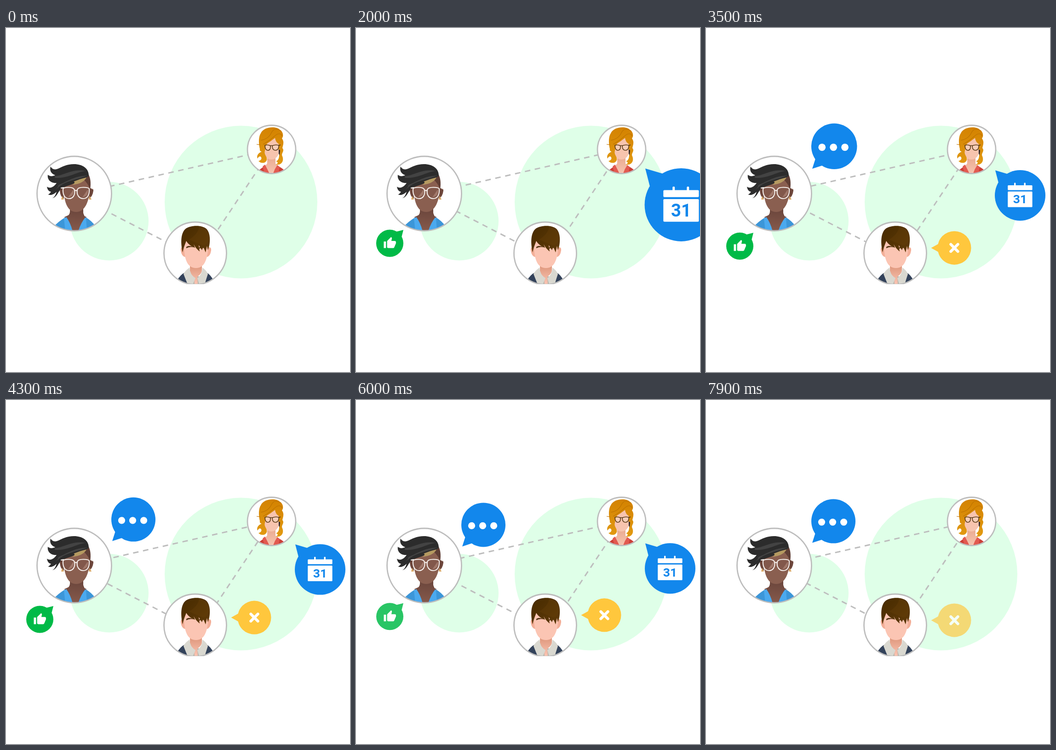
Animation, 748 px wide and 748 px high, one loop 8 s. Source, as an HTML page:

```html
<!DOCTYPE html>
<html lang="en">
<head>
<meta charset="utf-8">
<title>Connected people</title>
<style>
html, body { margin: 0; width: 100%; height: 100%; overflow: hidden; background: #fff; }
svg { display: block; width: 100vw; height: 100vh; }
.link { stroke: #bdbdbd; stroke-width: 3; stroke-dasharray: 12 10; }
.ring { fill: none; stroke: #bdbdbd; stroke-width: 2.8; }
.date { font: 600 26.5px Roboto, "Liberation Sans", sans-serif; text-anchor: middle; }
</style>
</head>
<body>
<svg viewBox="0 0 748 748">
  <defs>
    <clipPath id="clipA"><circle cx="148.5" cy="360" r="80"/></clipPath>
    <clipPath id="clipB"><circle cx="411.5" cy="490" r="67"/></clipPath>
    <clipPath id="clipC"><circle cx="577.5" cy="264" r="51.5"/></clipPath>
    <clipPath id="flat"><path d="M0 0H748V557H0z"/></clipPath>
    <linearGradient id="neckA" x1="0" x2="0" y1="0" y2="1">
      <stop offset="0" stop-color="#67433a"/><stop offset="1" stop-color="#85594b"/>
    </linearGradient>
    <linearGradient id="neckB" x1="0" x2="0" y1="0" y2="1">
      <stop offset="0" stop-color="#d98f73"/><stop offset="1" stop-color="#fbc5b3"/>
    </linearGradient>
    <linearGradient id="neckC" x1="0" x2="0" y1="0" y2="1">
      <stop offset="0" stop-color="#eaa98f"/><stop offset="1" stop-color="#f7c6b2"/>
    </linearGradient>
    <linearGradient id="brown" x1="0" x2="1" y1="0" y2="1">
      <stop offset="0" stop-color="#472b00"/><stop offset="1" stop-color="#5f3a08"/>
    </linearGradient>
    <linearGradient id="ginger" x1="0" x2="0" y1="0" y2="1">
      <stop offset="0" stop-color="#d38200"/><stop offset="1" stop-color="#e29a12"/>
    </linearGradient>
  </defs>

  <g fill="#dfffe8">
    <circle cx="224.5" cy="420" r="85.5"/>
    <circle cx="511" cy="378.5" r="166"/>
  </g>

  <path class="link" d="M181.3 354.5L561 268"/>
  <path class="link" d="M377 480L173 375"/>
  <path class="link" d="M565.4 281.4L421 498"/>

  <!-- left person -->
  <circle cx="148.5" cy="360" r="81" fill="#fff"/>
  <g clip-path="url(#clipA)">
    <path fill="#3c96d8" d="M102 434Q113 421 130 411L172 411Q186 418 197 434V445H102z"/>
    <path fill="#764c40" d="M127 411L138 406H164L175 411L157 446H145z"/>
    <path fill="url(#neckA)" d="M139 386H168V402Q170 409 173 412Q166 424 158 440H145Q139 423 129 412Q138 408 139 400z"/>
    <path fill="#4ba9ee" d="M131 411Q140 423 145 442H129L126 414z M173 411Q163 423 157 442H176L174 414z"/>
    <path fill="#6d463b" d="M125 350Q116 345 117 354Q118 368 126 371z M181 350Q190 344 190 354Q188 368 180 371z"/>
    <path fill="#d9a866" d="M122 365l4 8h-6z M182 365l4 8h-6z"/>
    <path fill="#8a5f50" d="M125 340C125 378 133 400 152.5 400C172 400 182 377 183 340L179 321L132 334z"/>
    <path fill="#5f3e35" d="M179 318Q186 329 183 351Q178 337 168 329z"/>
    <path fill="#2c2c2c" d="M180 321C180 305 166 296 148 296C132 296 122 302 113 306C106 309 100 307 97 301C94 311 99 317 107 320C101 323 95 323 91 319C89 330 98 338 110 337C104 346 96 350 89 345C90 352 94 356 98 356C95 360 93 362 91 362C98 365 105 361 110 356C108 363 105 368 101 370C111 368 114 354 122 347C135 343 150 338 160 332C168 328 176 326 180 321z"/>
    <path fill="#434343" d="M105 322C124 322 145 304 174 311C154 312 137 327 107 326z M110 343C126 338 147 321 177 321C158 329 134 331 118 343L106 353Q112 348 114 342z"/>
    <path fill="#b59a61" d="M143 341C154 340 169 337 175 325C165 327 157 330 147 334C151 335 149 339 143 341z"/>
    <g stroke="#f4eeea" stroke-width="2.2" fill="#82584b">
      <path d="M119 348L126 347M185 348L190 350M149 355Q152 351 155 355" fill="none"/>
      <path d="M124 350Q125 346.500 136 346.500T149 352C151 364 145 371 137 371S123 364 124 350z M155 352Q156 346.500 168 346.500T181 350C182 364 176 371 168 371S153 364 155 352z"/>
    </g>
    <path fill="#a1796b" d="M135 368L147 351Q149 366 135 368z M166 368L178 351Q180 366 166 368z"/>
  </g>
  <circle class="ring" cx="148.5" cy="360" r="81"/>

  <!-- lower person -->
  <g clip-path="url(#flat)">
    <circle cx="411.5" cy="490" r="68" fill="#fff"/>
    <g clip-path="url(#clipB)">
      <path fill="#33425a" d="M371 551Q378 536 392 530L404 560H371z M452 551Q446 536 433 530L420 560H452z"/>
      <path fill="#b8b6ae" d="M402 540H425V560H402z"/>
      <path fill="url(#neckB)" d="M400 510H426V524Q427 534 416 541L417 557H410L409 542Q398 534 400 524z"/>
      <path fill="#d9d8d0" d="M399 521Q389 528 386 535L396 560H405L412 544Q400 537 399 521z M427 521Q436 527 439 535L431 560H421L416 544Q427 536 427 521z"/>
      <path fill="#f3af98" d="M388 478Q379 474 380 484Q382 497 390 498z M437 478Q447 474 446 484Q444 497 436 498z"/>
      <path fill="#fbc5b3" d="M387 470C387 500 393 522 413 522S439 500 440 470L434 452H392z"/>
      <path fill="#573818" d="M392 476Q399 471 408 477Q399 475 392 479z M420 477Q428 473 434 477L433 480Q427 476 420 480z"/>
      <path fill="url(#brown)" d="M384 488C380 470 379 447 390 437C402 428 428 428 437 438C446 449 444 472 439 483L437 474L434 488L429 476L426 483L419 472L421 486C415 481 411 476 408 470L411 478C403 475 396 470 392 463C389 471 386 478 384 488z"/>
      <path fill="#6a430c" opacity=".3" d="M398 460Q418 448 420 432Q439 434 442 458Q438 471 430 473Q414 468 398 460z"/>
    </g>
    <circle class="ring" cx="411.5" cy="490" r="68"/>
  </g>

  <!-- right person -->
  <circle cx="577.5" cy="264" r="52.5" fill="#fff"/>
  <g clip-path="url(#clipC)">
    <path fill="#cc4038" d="M548 312Q555 303 567 299H587Q601 303 607 312V320H548z"/>
    <path fill="url(#neckC)" d="M568 280H586V295Q590 298 592 300L580 319H573L561 300Q568 297 568 293z"/>
    <path fill="#e25a50" d="M563 297Q569 308 574 319H563L558 301z M590 298Q583 308 580 319H592L595 302z"/>
    <path fill="#efad92" d="M558 255Q551 250 552 260Q553 269 560 270z"/>
    <path fill="#f7c4ae" d="M557 248C556 270 563 286 577 286S597 270 598 248L588 232H566z"/>
    <path fill="url(#ginger)" d="M552 263C549 252 549 236 554 229C560 214 588 213 595 221C603 225 604 236 600 240C606 248 602 255 601 261C607 268 597 272 601 279C605 289 599 299 587 297C593 294 591 291 587 290C594 287 594 280 594 272Q592 262 593 252Q586 248 585 239Q576 246 568 251Q564 258 563 267C560 275 569 280 567 287C565 295 553 295 549 289C555 288 557 283 554 280C552 278 549 280 547 284C544 278 549 271 556 269Q551 268 552 263z"/>
    <path fill="none" stroke="#bd7200" stroke-width="1.2" d="M554 244Q570 242 577 228T598 224M559 253Q573 245 584 235T601 235M545 253L553 254"/>
    <path fill="#2f2831" d="M593 264l3 2l-1 11l-2-4z"/>
    <g fill="#f8d5c2" fill-opacity=".6" stroke="#5b3c19" stroke-width="1.6">
      <path d="M563 255Q569 253 575 256Q576 266 569 266Q563 265 563 255z M579 256Q585 253 593 255Q594 265 586 266Q579 266 579 256z"/>
      <path fill="none" d="M574 257Q577 254 580 257M593 256L597 254"/>
    </g>
  </g>
  <circle class="ring" cx="577.5" cy="264" r="52.5"/>

  <!-- each bubble is drawn around the tip of its tail -->
  <g id="like" fill="#00ba47">
    <circle cx="-29.5" cy="29" r="29.5"/><path d="M0 0L-16 4L-4 16z"/>
    <path fill="#fff" transform="translate(-43.7 14.3) scale(1.2)" d="M1 21h4V9H1z M23 10a2 2 0 0 0-2-2h-6.3l1-4.6Q15.8 2.6 15.2 2L14.2 1L7.6 7.6Q7 8.2 7 9v10a2 2 0 0 0 2 2h9q1.3 0 1.8-1.2l3-7.1q.2-.3.2-.7z"/>
  </g>
  <g id="plan" fill="#1287ec">
    <circle cx="54" cy="54.5" r="55"/><path d="M0 0L34 10L9 35z"/>
    <g fill="#fff">
      <rect x="27.2" y="32.5" width="53.4" height="10.5" rx="1.5"/>
      <rect x="27.2" y="46" width="53.4" height="34" rx="1.5"/>
      <rect x="41" y="27" width="3.4" height="8" rx="1.4"/>
      <rect x="62.5" y="27" width="3.4" height="8" rx="1.4"/>
    </g>
    <text class="date" x="54" y="72">31</text>
  </g>
  <g id="deny" fill="#ffc73d">
    <circle cx="50.5" cy="0" r="36.5"/><path d="M0 0L18 -10L18 10z"/>
    <path stroke="#fff" stroke-width="6" stroke-linecap="round" d="M42.8 -7.7L58.2 7.7M58.2 -7.7L42.8 7.7"/>
  </g>
  <g id="chat" fill="#1287ec">
    <circle cx="46" cy="-47" r="48"/><path d="M0 0L8 -25L28 -9z"/>
    <g fill="#fff">
      <circle cx="20.5" cy="-45" r="7.6"/><circle cx="44.5" cy="-45" r="7.6"/><circle cx="68.5" cy="-45" r="7.6"/>
    </g>
  </g>
</svg>
<script>
const LOOP = 8000, STEP = 100;
const RISE = 540, SETTLE = 570, FADE = 600;
const DASH = 22, DASH_TIME = 3000;

const bubbles = [
  { id: "like", x: 103, y: 439, pop: 915, peak: 1.5, bob: 1930, drop: 9, period: 5000, fade: 5900 },
  { id: "plan", x: 629, y: 305.6, pop: 1553, peak: 1.5, bob: 2430, drop: 10, period: 5000, fade: 6600 },
  { id: "deny", x: 489.5, y: 479.4, pop: 2260, peak: 1.5, bob: 2950, drop: -12.2, period: 5300, fade: 7700 },
  { id: "chat", x: 231, y: 306, pop: 2765, peak: 1.05, bob: 3900, drop: 13.2, period: 5000, fade: Infinity }
];
for (const b of bubbles) b.el = document.getElementById(b.id);
const links = document.querySelectorAll(".link");

const clamp = v => Math.max(0, Math.min(1, v));
const swing = v => (1 - Math.cos(Math.PI * v)) / 2;

// Grow past full size, then settle back to 1.
function popScale(age, peak) {
  if (age < RISE) return peak * Math.sin(Math.PI / 2 * clamp(age / RISE));
  return peak + (1 - peak) * swing(clamp((age - RISE) / SETTLE));
}

function draw(t) {
  for (const link of links) link.style.strokeDashoffset = -DASH * (t % DASH_TIME) / DASH_TIME;
  for (const b of bubbles) {
    const scale = popScale(t - b.pop, b.peak);
    const y = b.y + b.drop * swing(2 * Math.max(0, t - b.bob) / b.period);
    b.el.setAttribute("transform", `translate(${b.x} ${y}) scale(${scale})`);
    b.el.setAttribute("opacity", scale > 0 ? 1 - clamp((t - b.fade) / FADE) : 0);
  }
}

const start = performance.now();
function tick() {
  const t = (performance.now() - start) % LOOP;
  draw(Math.floor(t / STEP) * STEP);
  requestAnimationFrame(tick);
}
tick();
</script>
</body>
</html>
```
